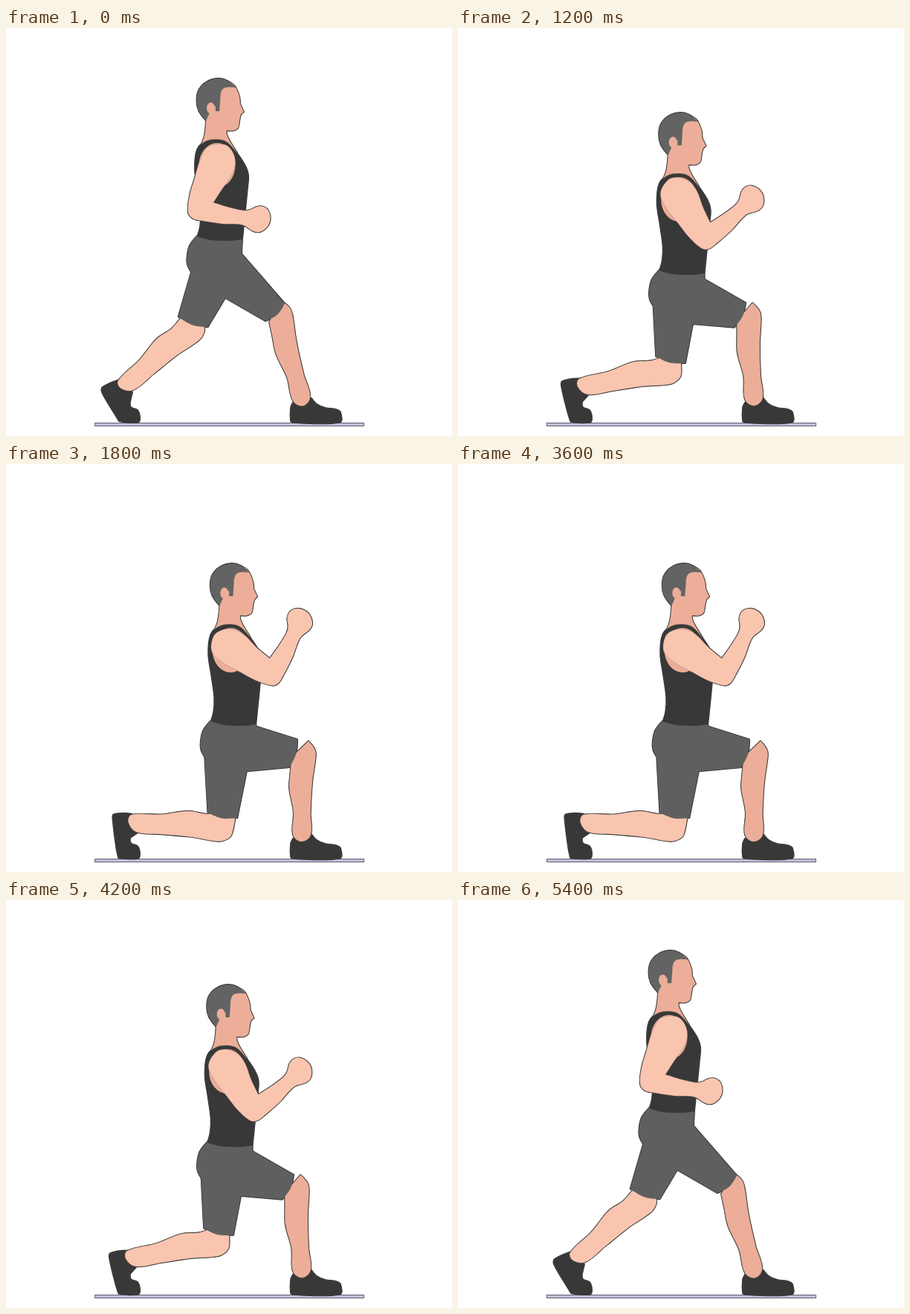
An HTML page with a canvas that plays this animation: 600 px wide and 550 px high, repeating every 6000 ms.

```html
<!DOCTYPE html>
<html lang="en">
<head>
<meta charset="utf-8">
<title>Split squat</title>
<style>
  html, body { margin: 0; width: 100%; height: 100%; overflow: hidden; background: #fff; }
  canvas { display: block; }
</style>
</head>
<body>
<canvas id="stage" width="600" height="550"></canvas>
<script>
const ctx = document.getElementById('stage').getContext('2d');
const STEP = 600;
const DEPTHS = [0, 0.28, 0.575, 0.825, 1];
const SKIN = '#f9c5af', SHADE = '#ecae98', CLOTH = '#5f5f5f', DARK = '#383838', HAIR = '#636363';

const mix = (a, b, t) => a + (b - a) * t;
const between = (p, q, t) => [mix(p[0], q[0], t), mix(p[1], q[1], t)];
const add = (p, q) => [p[0] + q[0], p[1] + q[1]];

// Point on a bone: u runs along it, v to its clockwise side.
function along([x, y], degrees, u, v = 0) {
  const a = degrees * Math.PI / 180, c = Math.cos(a), s = Math.sin(a);
  return [x + u * c - v * s, y + u * s + v * c];
}

const onBone = (origin, degrees, shape, stretch = 1) =>
  shape.map(([u, v]) => along(origin, degrees, u * stretch, v));

// "x y, x y" to points.
const points = text => text.split(',').map(pair => pair.trim().split(' ').map(Number));

// Closed outline: smooth inside each run of points, cornered where runs meet.
function outline(...runs) {
  const path = new Path2D();
  let last = null;
  for (const run of runs) {
    const pts = last ? [last, ...run] : run;
    if (!last) path.moveTo(...pts[0]);
    const handle = (i, length) => {
      const [x, y] = pts[i], a = pts[i - 1], b = pts[i + 1];
      if (!a || !b) return [x, y];
      const k = length / 3 / (Math.hypot(b[0] - a[0], b[1] - a[1]) || 1);
      return [x + (b[0] - a[0]) * k, y + (b[1] - a[1]) * k];
    };
    for (let i = 1; i < pts.length; i++) {
      const [p, q] = [pts[i - 1], pts[i]];
      const length = Math.hypot(q[0] - p[0], q[1] - p[1]);
      path.bezierCurveTo(...handle(i - 1, length), ...handle(i, -length), ...q);
    }
    last = pts[pts.length - 1];
  }
  path.closePath();
  return path;
}

function ellipse(x, y, rx, ry) {
  const path = new Path2D();
  path.ellipse(x, y, rx, ry, 0, 0, Math.PI * 2);
  return path;
}

// Rigid parts, placed for the standing pose.
const head = outline(
  points('285 70, 303 74, 309 80, 314 92, 315 102'), points('320 113'),
  points('316 117, 314 126, 312 135, 305 138.5, 297 138'),
  points('297 143, 301 152, 311 168'), points('290 178'), points('261 160'),
  points('266 148, 268 137, 269 124'));
const hair = outline(
  points('309 80, 298 71, 285 68, 269 73, 259 84, 256.5 98, 259 111, 269 125'),
  points('273 116'), points('282 104'), points('282 112'), points('287 112'),
  points('288 98, 289 87, 293 81, 301 79.5'));
const ear = ellipse(275.5, 108, 5.5, 7.5);
const tank = outline(
  points('257 282, 261 268, 262 249, 258 219, 254 190, 257 164, 268 153, 283 150, 296 153, 308 165, 321 184, 326 198, 325 215, 318 285'),
  points('302 287, 275 286, 257 281'));
const armhole = ellipse(284, 185, 24.5, 30);
const seat = points('257 280, 247 293, 243.5 308, 244 319, 249 329');
const frontFoot = outline(
  points('386 505, 383 512, 383 530, 385 531.5'),
  points('449 531.5, 450 518, 444 514, 430 512, 418 507, 411 499'));
const toe = points('178 531.5, 180 524, 177 515, 168 511, 167 504');
const heelHigh = points('152 474, 130 484, 129 491, 146 520, 152 530');
const heelLow = points('173 471, 148 470, 147 479, 149 518, 151 531');

// Limb contours in bone coordinates.
const upperFront = points('30 -19, 8 -25, -9 -24, -22 -15');
const upperBack = points('-27 -2, -18 17, 2 22, 30 21, 52 20, 75 14.5');
const forearm = points('-8 14, 4 15, 32 14.5, 59 11.5, 75 17.5, 84 17, 93 8, 95 -3, 91 -13, 84 -17.5, 75 -16.5, 65 -10, 56 -8, 34 -9.5, 16 -12');
const nearShin = points('6 20, 22 18, 46 21, 82 15, 122 13, 126 3, 115 -10, 80 -12, 40 -14, 4 -18.5, -8 -15, -14 -8, -18 18');
const farShin = points('-17 -8, -7 -16, 2 -18, 38 -13.5, 79 -11.5, 108 -12, 117 0, 108 12, 78 11.5, 46 17.5, 22 16, 5 15');

// Every joint follows one number: how far the body has sunk.
function buildPose(depth) {
  const shift = [21 * depth * (1.3 - 0.3 * depth), 80 * depth];
  const blend = (p, q) => between(p, q, depth);
  const body = p => add(p, shift);

  const shoulder = body([283, 182]);
  const upperAngle = mix(109, 14, depth);
  const elbow = along(shoulder, upperAngle, 66);
  const inner = onBone(elbow, mix(9.5, -77.5, depth), forearm);
  const arm = outline(
    [inner[inner.length - 1], ...onBone(shoulder, upperAngle, [...upperFront, ...upperBack]), ...inner]);

  const farAngle = mix(74.8, 93.8, depth);
  const farLength = mix(118, 109, depth);
  const farKnee = along([398, 501], farAngle, -farLength);

  const swing = depth - 0.05 * Math.sin(2 * Math.PI * depth);
  const nearAngle = mix(138.4, 188.8, swing);
  const nearKnee = along(blend([162, 483], [174, 486.5]), nearAngle, -118.5);

  const hemHalf = [20, mix(7, 3, depth)];
  const hemMid = add(nearKnee, [1, mix(-8, -19, depth)]);
  const hemLeft = add(hemMid, [-hemHalf[0], -hemHalf[1]]);
  const shorts = outline(
    seat.map(body),
    [hemLeft],
    [add(hemMid, [-1, 4]), add(hemMid, hemHalf)],
    [body(blend([295, 364], [308, 345]))],
    [add(farKnee, blend([-18, 8], [-18, 21]))],
    [add(farKnee, blend([-2, -1], [-10, 0])), add(farKnee, blend([8, -16], [-10, -20]))],
    [body(blend([317, 304], [319, 284]))],
    [body([318, 285])]);

  const nearFoot = outline(
    heelHigh.map((p, i) => blend(p, heelLow[i])), toe, [blend([170, 491], [178, 499])]);

  const fixed = (path, color) => ({ path, color, at: [0, 0] });
  const carried = (path, color) => ({ path, color, at: shift });
  return [
    fixed(frontFoot, DARK),
    fixed(outline(onBone(farKnee, farAngle, farShin, farLength / 109)), SHADE),
    fixed(nearFoot, DARK),
    fixed(outline(onBone(nearKnee, nearAngle, nearShin)), SKIN),
    fixed(shorts, CLOTH),
    carried(head, SHADE),
    carried(hair, HAIR),
    carried(ear, SHADE),
    carried(tank, DARK),
    carried(armhole, SHADE),
    fixed(arm, SKIN)
  ];
}

const poses = DEPTHS.map(buildPose);

function eachLayer(layers, paint) {
  for (const { path, color, at } of layers) {
    ctx.save();
    ctx.translate(...at);
    paint(path, color);
    ctx.restore();
  }
}

function draw(time) {
  ctx.fillStyle = '#fff';
  ctx.fillRect(0, 0, 600, 550);
  ctx.fillStyle = '#c2c0dc';
  ctx.fillRect(119, 532, 363, 5);
  ctx.strokeStyle = '#62616c';
  ctx.lineWidth = 1;
  ctx.strokeRect(119.5, 532.5, 362, 4);

  // Down through the poses, then back up.
  const step = Math.floor(time / STEP) % (2 * poses.length);
  const layers = poses[Math.min(step, 2 * poses.length - 1 - step)];
  ctx.lineJoin = 'round';
  ctx.strokeStyle = '#2b2b2b';
  ctx.lineWidth = 1.8;
  eachLayer(layers, path => ctx.stroke(path));

  // Soft seams between neighbouring parts.
  ctx.strokeStyle = 'rgba(95, 95, 95, 0.3)';
  ctx.lineWidth = 1;
  eachLayer(layers, (path, color) => {
    ctx.fillStyle = color;
    ctx.fill(path);
    if (path !== ear && path !== armhole) ctx.stroke(path);
  });
}

function tick() {
  draw(performance.now());
  requestAnimationFrame(tick);
}
tick();
</script>
</body>
</html>
```
